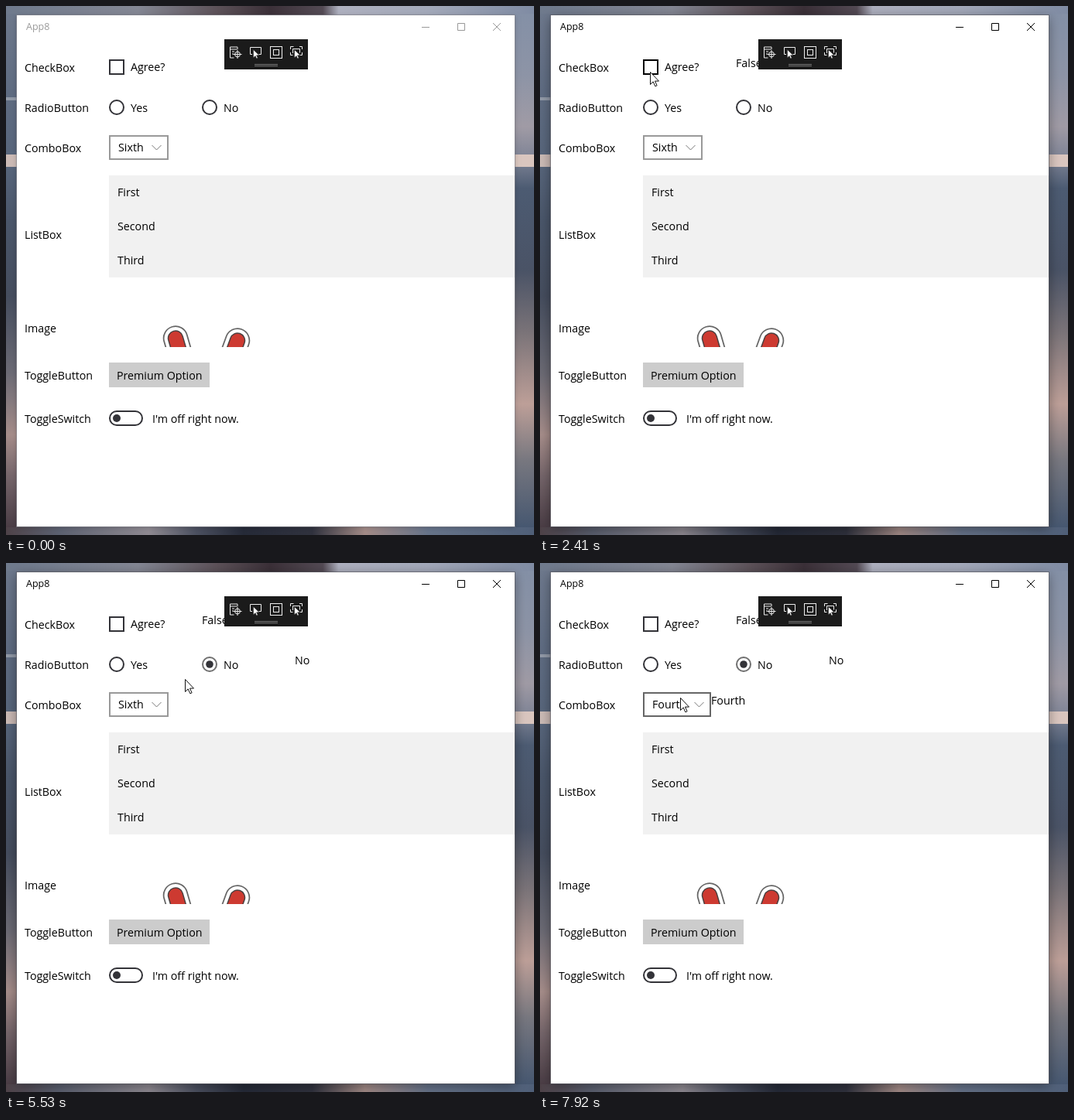
Recreate the animation shown at these times as an HTML page with a canvas. Size 682 px wide and 684 px high, loop 7990 ms.

```html
<!DOCTYPE html>
<html lang="en">
<head>
<meta charset="utf-8">
<title>Controls demo</title>
<style>
html, body { margin: 0; width: 682px; height: 684px; overflow: hidden; }
canvas { display: block; }
</style>
</head>
<body>
<canvas id="stage" width="682" height="684"></canvas>
<script>
const ctx = document.getElementById('stage').getContext('2d');
const LOOP = 7990;
const INK = '#333338';

// Pointer track: time, x, y
const track = [
  [0, 57, 700], [70, 57, 684], [220, 140, 500], [350, 184, 350], [490, 194, 220], [540, 194, 220],
  [670, 165, 130], [850, 140, 82], [2400, 140, 82], [2410, 142, 85], [2480, 142, 85], [2490, 148, 92],
  [3600, 148, 92], [3950, 138, 141], [4330, 138, 141], [4900, 271, 128], [5430, 271, 128],
  [5530, 231, 150], [5600, 231, 150], [5760, 195, 184], [6149, 195, 184], [6150, 199, 186],
  [6300, 199, 186], [6420, 192, 151], [6840, 192, 151], [7000, 186, 179], [7610, 186, 179],
  [7690, 181, 150], [7780, 181, 150], [7920, 181, 174], [LOOP, 181, 174]
];
const options = ['Fourth', 'Fifth', 'Sixth'];
const comboWidths = [88, 74, 77];
const popups = [{ from: 5800, to: 6450, index: 2 }, { from: 7220, to: 7720, index: 1 }];

const within = (t, a, b) => t >= a && t < b;
const clamp = v => Math.max(0, Math.min(1, v));
const easeOut = v => 1 - (1 - v) ** 3;

function pointerAt(t) {
  const i = Math.max(1, track.findIndex(k => k[0] > t));
  const [t0, x0, y0] = track[i - 1], [t1, x1, y1] = track[i];
  const p = clamp((t - t0) / (t1 - t0));
  return { x: Math.round(x0 + (x1 - x0) * p), y: Math.round(y0 + (y1 - y0) * p) };
}

function box(x, y, w, h, color) {
  ctx.fillStyle = color;
  ctx.fillRect(x, y, w, h);
}
function frame(x, y, w, h, color, line) {
  ctx.strokeStyle = color;
  ctx.lineWidth = line;
  ctx.strokeRect(x + line / 2, y + line / 2, w - line, h - line);
}
function path(d, color, line, fill) {
  const p = new Path2D(d);
  if (fill) { ctx.fillStyle = fill; ctx.fill(p); }
  ctx.strokeStyle = color;
  ctx.lineWidth = line;
  ctx.stroke(p);
}
function disc(x, y, r, color, line) {
  ctx.beginPath();
  ctx.arc(x, y, r, 0, 7);
  ctx.fillStyle = ctx.strokeStyle = color;
  if (line) { ctx.lineWidth = line; ctx.stroke(); } else ctx.fill();
}
function text(s, x, y, color = '#000', size = 14.25) {
  ctx.font = `${size}px "Open Sans", "Noto Sans", sans-serif`;
  ctx.fillStyle = color;
  ctx.fillText(s, x, y);
}
function gradient(x, y, w, h, colors) {
  const g = w > h ? ctx.createLinearGradient(x, 0, x + w, 0) : ctx.createLinearGradient(0, y, 0, y + h);
  colors.forEach(([at, c]) => g.addColorStop(at, c));
  box(x, y, w, h, g);
}

function drawBackdrop() {
  gradient(0, 0, 682, 12, [[0, '#6f7a8d'], [.25, '#848794'], [.4, '#5c5158'], [.5, '#3b3038'],
    [.6, '#534a54'], [.63, '#aeb0bf'], [.8, '#a3a9ba'], [1, '#7f8ba3']]);
  gradient(0, 672, 682, 12, [[0, '#4e4248'], [.1, '#5b6070'], [.27, '#8f8a92'], [.36, '#4b5060'],
    [.45, '#252a38'], [.58, '#30323e'], [.68, '#a38b87'], [.8, '#66738a'], [1, '#4f5f78']]);
  gradient(0, 10, 14, 664, [[0, '#6d788c'], [.15, '#5f6c82'], [.3, '#56647a'], [.4, '#4a566a'],
    [.55, '#454d5e'], [.7, '#6b6a74'], [.82, '#a68d8a'], [.9, '#75656a'], [1, '#4a3d45']]);
  gradient(657, 10, 25, 664, [[0, '#8490a6'], [.12, '#8d94a6'], [.22, '#a09ba5'], [.28, '#7f8496'],
    [.34, '#4c5b72'], [.5, '#4a5366'], [.62, '#7a7378'], [.76, '#bd9f98'], [.87, '#77777f'], [1, '#465770']]);
  box(0, 118, 14, 4, '#929aa8');
  box(0, 192, 14, 16, '#cbbab5');
  box(657, 192, 25, 16, '#dac6bf');
}

function drawWindow(active) {
  ctx.save();
  ctx.shadowColor = `rgba(0,0,0,${active ? .4 : .25})`;
  ctx.shadowBlur = active ? 14 : 6;
  ctx.shadowOffsetY = active ? 3 : 1;
  box(14, 12, 643, 661, '#fff');
  ctx.restore();
  frame(13, 11, 645, 663, active ? 'rgba(90,90,98,.65)' : 'rgba(130,130,138,.6)', 1);
  const color = active ? '#000' : '#999';
  text('App8', 26, 31, color, 12.5);
  path('M537 27.5h10M583.5 22.5h9v9h-9zM629 22l10 10M639 22l-10 10', color, 1);
}

function drawCheckBox(t, p) {
  const hover = within(p.x, 133, 253) && within(p.y, 63, 96);
  const checked = within(t, 1080, 2060) || within(t, 2830, 3560);
  const pressed = within(t, 930, 1080) || within(t, 2010, 2060) || within(t, 2740, 2830) || within(t, 3500, 3560);
  if (checked || pressed) box(133, 69, 20, 20, pressed ? '#999' : '#6b6b6b');
  frame(133, 69, 20, 20, checked ? '#666' : hover ? '#000' : INK, 2);
  if (checked) path('M137 79l4 4.5 8.5-9', '#fff', 1.5);
  text('Agree?', 161, 84);
  if (t >= 1080) text(checked ? 'True' : 'False', 253, 79);
}

function drawRadio(x, label, checked, p) {
  const hover = within(p.x, x, x + 120) && within(p.y, 116, 148);
  disc(x + 10, 131, 9, hover ? '#000' : checked ? '#707070' : INK, 2);
  if (checked) disc(x + 10, 131, 4.8, hover ? '#000' : INK);
  text(label, x + 28, 137);
}

function drawPopup(t, p, { from, to, index }) {
  const grow = t < to ? .3 + .7 * easeOut(clamp((t - from) / 180)) : 1 - clamp((t - to) / 110);
  const top = 159 - index * 32;
  const y0 = 167 + (top - 167) * grow, y1 = 199 + (top + 112 - 199) * grow;
  ctx.save();
  ctx.beginPath();
  ctx.rect(133, y0, 80, y1 - y0);
  ctx.clip();
  box(133, top, 80, 112, '#f2f2f2');
  options.forEach((name, i) => {
    const y = top + 8 + i * 32;
    const hover = within(p.y, y, y + 32);
    if (i === index) box(134, y, 78, 32, hover ? '#a9a9a9' : '#b9b9b9');
    else if (hover) box(134, y, 78, 32, '#dadada');
    text(name, 145, y + 21);
  });
  frame(133, y0, 80, y1 - y0, '#ccc', 1);
  ctx.restore();
}

function drawComboBox(t, p) {
  const selected = t < 6450 ? 2 : t < 7720 ? 1 : 0;
  const popup = popups.find(o => within(t, o.from, o.to + 110));
  const open = popup && t < popup.to;
  const width = open ? 64 : comboWidths[selected];
  const right = 133 + width;
  const pressed = within(t, 5740, 5800) || within(t, 7040, 7220);
  const hover = !open && within(p.x, 133, right) && within(p.y, 167, 199);
  if (pressed) box(133, 167, width, 32, '#ccc');
  frame(133, 167, width, 32, hover && !pressed ? '#666' : '#999', 2);
  if (!open) text(options[selected], 145, 188);
  path(`M${right - 21.5} 180l6 6 6-6`, '#777', 1);
  if (t >= 6450) text(options[selected], right, 183);
  return popup;
}

function drawListBox(p) {
  box(133, 219, 524, 132, '#f1f1f1');
  ['First', 'Second', 'Third'].forEach((name, i) => {
    const y = 219 + i * 44;
    if (p.x >= 133 && within(p.y, y, y + 44)) box(133, y, 524, 44, '#dadada');
    text(name, 144, y + 27);
  });
}

function drawPicture() {
  ctx.save();
  ctx.beginPath();
  ctx.rect(133, 400, 250, 41);
  ctx.clip();
  ctx.lineCap = 'round';
  for (const d of ['M219 429.500L231 471', 'M299 432.500L285 471'])
    [[32.5, '#666'], [29, '#fff'], [20.5, '#4a4040'], [17.5, '#cd3a31']].forEach(([w, c]) => path(d, c, w));
  ctx.restore();
}

function drawToggles() {
  box(133, 461, 130, 32, '#ccc');
  text('Premium Option', 143, 483);
  ctx.beginPath();
  ctx.roundRect(134, 524, 42, 18, 9);
  ctx.strokeStyle = INK;
  ctx.lineWidth = 2;
  ctx.stroke();
  disc(143, 533, 5, INK);
  text("I'm off right now.", 189, 539);
}

function drawToolbar() {
  box(282, 43, 108, 39, '#1b1b1b');
  const arrow = 'l0 10.500 2.500-2.500 1.600 3.500 1.600-.8-1.600-3.400h3.400z';
  path('M299 56v-3h-9.500v14h5M289.500 56h9M292 59h3M292 62h2M299 57v11M293.500 62.500h11', '#eee', 1);
  disc(299, 62.5, 3.4, '#eee', 1);
  path('M318 62.500h-2.500v-9h14v9h-3', '#eee', 1);
  path('M319.500 56.500' + arrow, '#1b1b1b', .5, '#fff');
  frame(341, 52, 16, 16, '#eee', 1);
  frame(345, 56, 8, 8, '#eee', 1);
  path('M367.500 56v-3.500h4M379 52.500h3.500v3.500M367.500 60v3.500h3M382.500 60v3.500h-3M370.500 61v-5.500h9v5', '#eee', 1);
  path('M372.500 56.500' + arrow, '#1b1b1b', .5, '#fff');
  path('M321 75.500h30M321 77.500h30', '#777', 1);
}

function drawPointer({ x, y }) {
  ctx.save();
  ctx.translate(x, y);
  path('M.5 .5v16l3.700-3.600 2.600 5.900 2.300-1-2.600-5.700h5z', '#111', 1, '#fff');
  ctx.restore();
}

const labels = { CheckBox: 85, RadioButton: 137, ComboBox: 189, ListBox: 301, Image: 422, ToggleButton: 483, ToggleSwitch: 539 };

function draw(t) {
  const p = pointerAt(t);
  drawBackdrop();
  drawWindow(t >= 930);
  for (const name in labels) text(name, 24, labels[name]);
  drawCheckBox(t, p);
  const yes = within(t, 4250, 5040), no = t >= 5040;
  drawRadio(133, 'Yes', yes, p);
  drawRadio(253, 'No', no, p);
  if (yes || no) text(yes ? 'Yes' : 'No', 373, 131);
  drawListBox(p);
  drawPicture();
  drawToggles();
  const popup = drawComboBox(t, p);
  if (popup) drawPopup(t, p, popup);
  drawToolbar();
  drawPointer(p);
}

const start = performance.now();
function tick() {
  draw((performance.now() - start) % LOOP);
  requestAnimationFrame(tick);
}
tick();
</script>
</body>
</html>
```
